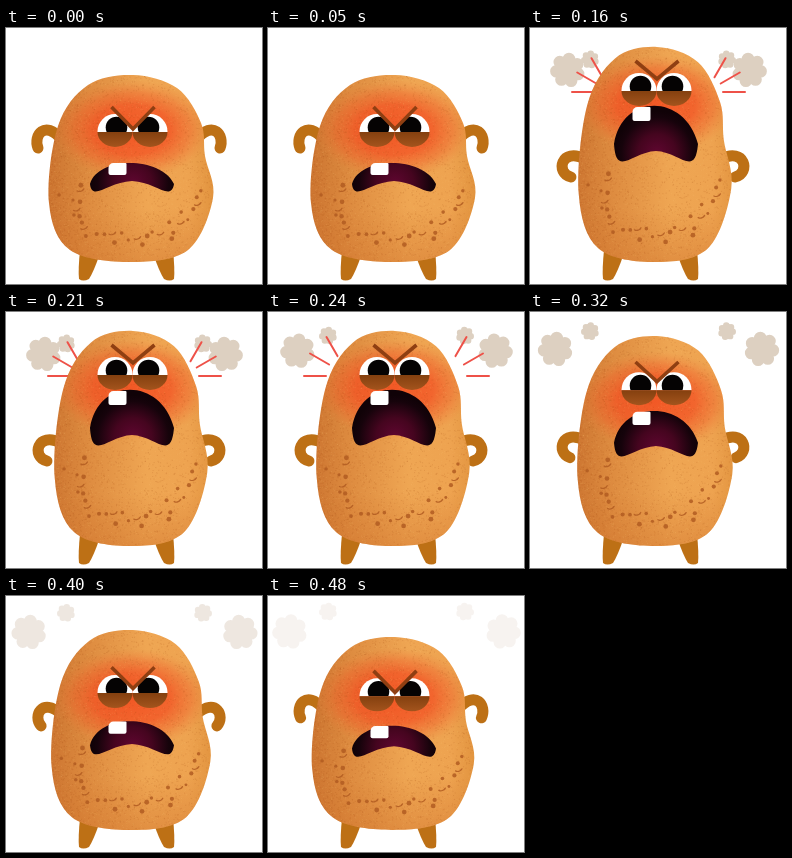
Animation, 256 px wide and 256 px high, one loop 0.56 s. Source, as an HTML page with a canvas:

```html
<!DOCTYPE html>
<html lang="en">
<head>
<meta charset="utf-8">
<title>Angry potato</title>
<style>
  html, body { margin: 0; width: 100%; height: 100%; overflow: hidden; background: #fff; }
  canvas { display: block; width: 100vw; height: 100vh; }
</style>
</head>
<body>
<canvas id="stage" width="256" height="256"></canvas>
<script>
const ctx = document.getElementById('stage').getContext('2d');
const STEP = 80;
const TURN = Math.PI * 2;
const LIMB = '#bd7015';

// How far the body is stretched and the face is raised at each step.
const STRETCH = [0, 1, 1, 1, .82, .46, .21];
const RAGE = [0, .92, 1, 1, .63, .17, .09];

// Body outline at rest, clockwise from the top.
const OUTLINE = [
  [127, 47], [171, 60], [195, 95], [199, 128], [207, 170], [182, 222],
  [125, 234], [64, 222], [43, 175], [52, 98], [82, 57]
];

const mix = (a, b, k) => a + (b - a) * k;
const ease = k => k * k * (3 - 2 * k);

// Stretches a resting point upwards from the feet.
const stretched = (x, y, k) =>
  [125 + (x - 125) * mix(1, .93, k), 234 - (234 - y) * mix(1, 1.15, k)];

function seeded(seed) {
  return () => (seed = (seed * 16807) % 2147483647) / 2147483647;
}

function disc(x, y, r, fill) {
  ctx.fillStyle = fill;
  ctx.beginPath();
  ctx.arc(x, y, r, 0, TURN);
  ctx.fill();
}

// Closed smooth curve through all points.
function smooth(points) {
  const n = points.length;
  const at = i => points[(i + n) % n];
  ctx.beginPath();
  ctx.moveTo(...points[0]);
  for (let i = 0; i < n; i++) {
    const [a, b, c, d] = [at(i - 1), at(i), at(i + 1), at(i + 2)];
    ctx.bezierCurveTo(
      b[0] + (c[0] - a[0]) / 6, b[1] + (c[1] - a[1]) / 6,
      c[0] - (d[0] - b[0]) / 6, c[1] - (d[1] - b[1]) / 6, c[0], c[1]);
  }
  ctx.closePath();
}

function gradient(grad, ...stops) {
  stops.forEach(([at, colour]) => grad.addColorStop(at, colour));
  return grad;
}

function mirrored(axis, draw) {
  draw();
  ctx.save();
  ctx.translate(axis * 2, 0);
  ctx.scale(-1, 1);
  draw();
  ctx.restore();
}

// Adds a lumpy cloud to the current path.
function puff(x, y, r) {
  const lobe = (cx, cy, size) => {
    ctx.moveTo(cx + size, cy);
    ctx.arc(cx, cy, size, 0, TURN);
  };
  lobe(x, y, r * .7);
  for (let i = 0; i < 7; i++) {
    const angle = i * TURN / 7 + .35;
    lobe(x + Math.cos(angle) * r * .64, y + Math.sin(angle) * r * .64, r * .36);
  }
}

function drawSteam(step) {
  const near = Math.exp(-.6 * (step - 1));
  mirrored(128.5, () => {
    ctx.globalAlpha = Math.min(1, .5 ** (step - 4));
    ctx.fillStyle = '#ddd0c1';
    ctx.beginPath();
    puff(20 + 32 * near, 35 + 13 * near, 17.5);
    puff(60, 14 + 32 * near, 9);
    ctx.fill();
    ctx.globalAlpha = 1;
  });
}

// Three rays fan out from each side of the head.
function drawRays(step) {
  const inner = 5 + 6 * step, outer = inner + Math.min(22, 14 * step);
  ctx.strokeStyle = '#ee5148';
  ctx.lineWidth = 2;
  ctx.lineCap = 'round';
  mirrored(128.5, () => {
    for (let i = 0; i < 3; i++) {
      const dx = -Math.cos(i * Math.PI / 6), dy = -Math.sin(i * Math.PI / 6);
      ctx.beginPath();
      ctx.moveTo(81 + dx * inner, 64 + dy * inner);
      ctx.lineTo(81 + dx * outer, 64 + dy * outer);
      ctx.stroke();
    }
  });
}

function drawLegs() {
  ctx.fillStyle = LIMB;
  mirrored(120.5, () => {
    ctx.beginPath();
    ctx.moveTo(74, 222);
    ctx.lineTo(93, 228);
    ctx.quadraticCurveTo(88, 243, 83, 251);
    ctx.quadraticCurveTo(77, 254, 73, 251);
    ctx.quadraticCurveTo(72, 242, 74, 222);
    ctx.fill();
  });
}

function drawArms(k) {
  ctx.strokeStyle = LIMB;
  ctx.lineWidth = 11;
  ctx.lineCap = 'round';
  mirrored(123, () => {
    ctx.beginPath();
    ctx.moveTo(55, mix(111, 131, k));
    ctx.bezierCurveTo(
      mix(39, 31, k), mix(92, 119, k),
      mix(27, 25, k), mix(107, 145, k),
      mix(32, 41, k), mix(120, 149, k));
    ctx.stroke();
  });
}

function drawSkin() {
  ctx.fillStyle = gradient(ctx.createLinearGradient(42, 0, 207, 0),
    [0, '#cc7430'], [.25, '#de8c40'], [.6, '#efa653'], [.85, '#eea350'], [1, '#e2943f']);
  ctx.fillRect(0, 0, 256, 256);
  ctx.fillStyle = gradient(ctx.createLinearGradient(0, 180, 0, 234),
    [0, 'rgba(205,110,40,0)'], [1, 'rgba(205,110,40,.4)']);
  ctx.fillRect(0, 180, 256, 60);
}

// Flush of anger around the face.
function drawFlush(k, flat) {
  ctx.save();
  ctx.translate(126, flat + mix(-2, 14, k));
  ctx.scale(1, .64);
  ctx.fillStyle = gradient(ctx.createRadialGradient(0, 0, 0, 0, 0, 78),
    [0, 'rgba(243,76,30,.85)'], [.5, 'rgba(243,80,34,.75)'],
    [.75, 'rgba(240,95,42,.45)'], [1, 'rgba(238,125,58,0)']);
  ctx.fillRect(-90, -90, 180, 180);
  ctx.restore();
}

function drawGrain(k) {
  const random = seeded(41);
  for (let i = 0; i < 4500; i++) {
    const [x, y] = stretched(40 + 170 * random() ** 1.4, 45 + 190 * random(), k);
    ctx.fillStyle = random() < .6 ? 'rgba(160,70,20,.17)' : 'rgba(255,205,130,.15)';
    ctx.fillRect(x, y, 1, 1);
  }
}

// Spots and small dents lie scattered along the lower rim.
function drawSpots(k) {
  const random = seeded(7), count = 32;
  ctx.fillStyle = ctx.strokeStyle = 'rgba(178,92,34,.85)';
  ctx.lineWidth = 1.3;
  for (let i = 0; i < count; i++) {
    const angle = mix(-.1, Math.PI + .35, (i + random() * .6) / count);
    const reach = mix(.68, 1, random());
    const [x, y] = stretched(
      125 + 72 * reach * Math.cos(angle), 168 + 54 * reach * Math.sin(angle), k);
    const size = mix(1.4, 2.5, random());
    ctx.beginPath();
    if (i % 4 === 2) {
      ctx.arc(x, y - 3, 5, .5, 2);
      ctx.stroke();
    } else {
      ctx.arc(x, y, size, 0, TURN);
      ctx.fill();
    }
  }
}

function drawBody(k, flat) {
  ctx.save();
  smooth(OUTLINE.map(([x, y]) => stretched(x, y, k)));
  ctx.clip();
  drawSkin();
  drawFlush(k, flat);
  drawGrain(k);
  drawSpots(k);
  ctx.restore();
}

function drawEyes(k, flat) {
  const tip = flat - mix(3, 12, k), brow = tip - mix(22, 18, k);

  // Whites and pupils show only below the brows and above the lids.
  ctx.save();
  ctx.beginPath();
  ctx.moveTo(127, tip);
  ctx.lineTo(87, tip - 38);
  ctx.lineTo(80, flat);
  ctx.lineTo(174, flat);
  ctx.lineTo(167, tip - 38);
  ctx.clip();
  mirrored(126.5, () => {
    disc(109, flat - .5, 17.5, '#fff');
    disc(110.5, flat - 4.5, 10.8, '#050303');
  });
  ctx.restore();

  ctx.fillStyle = gradient(ctx.createLinearGradient(0, flat, 0, flat + 15),
    [0, '#84400f'], [1, '#a3541d']);
  mirrored(126.5, () => {
    ctx.beginPath();
    ctx.ellipse(109, flat, 17.5, 15, 0, 0, Math.PI);
    ctx.fill();
  });

  ctx.strokeStyle = '#8f3f12';
  ctx.lineWidth = 3.6;
  ctx.lineCap = 'butt';
  ctx.beginPath();
  ctx.moveTo(105.5, brow);
  ctx.lineTo(127, tip);
  ctx.lineTo(148.5, brow);
  ctx.stroke();
}

function drawMouth(k) {
  const corner = mix(156, 116, k), arch = mix(128, 65, k);
  const lobe = mix(174, 150, k), middle = mix(153, 123, k);
  ctx.fillStyle = gradient(ctx.createRadialGradient(127, middle + 2, 0, 127, middle + 2, 42),
    [0, '#5f0630'], [.45, '#45051f'], [.85, '#16030b'], [1, '#100207']);
  ctx.beginPath();
  ctx.moveTo(84, corner);
  ctx.bezierCurveTo(92, arch, 155, arch, 168, corner);
  ctx.bezierCurveTo(165, lobe, 150, middle + 1, 126, middle);
  ctx.bezierCurveTo(102, middle + 1, 86, lobe, 84, corner);
  ctx.fill();

  ctx.fillStyle = '#fff';
  ctx.beginPath();
  ctx.roundRect(102.5, mix(135, 79, k), 18, mix(12, 14, k), [5, 1, 2, 2]);
  ctx.fill();
}

function draw(step) {
  const stretch = STRETCH[step], rage = RAGE[step];
  const flat = mix(104, 63, rage);
  ctx.fillStyle = '#fff';
  ctx.fillRect(0, 0, 256, 256);
  if (step > 0) drawSteam(step);
  if (step > 0 && step < 4) drawRays(step);
  drawLegs();
  drawArms(ease(stretch ** 1.2));
  drawBody(stretch, flat);
  drawMouth(rage);
  drawEyes(rage, flat);
}

const start = performance.now();
let shown = -1;

function tick() {
  const step = Math.floor((performance.now() - start) / STEP) % STRETCH.length;
  if (step !== shown) draw(shown = step);
  requestAnimationFrame(tick);
}
tick();
</script>
</body>
</html>
```
